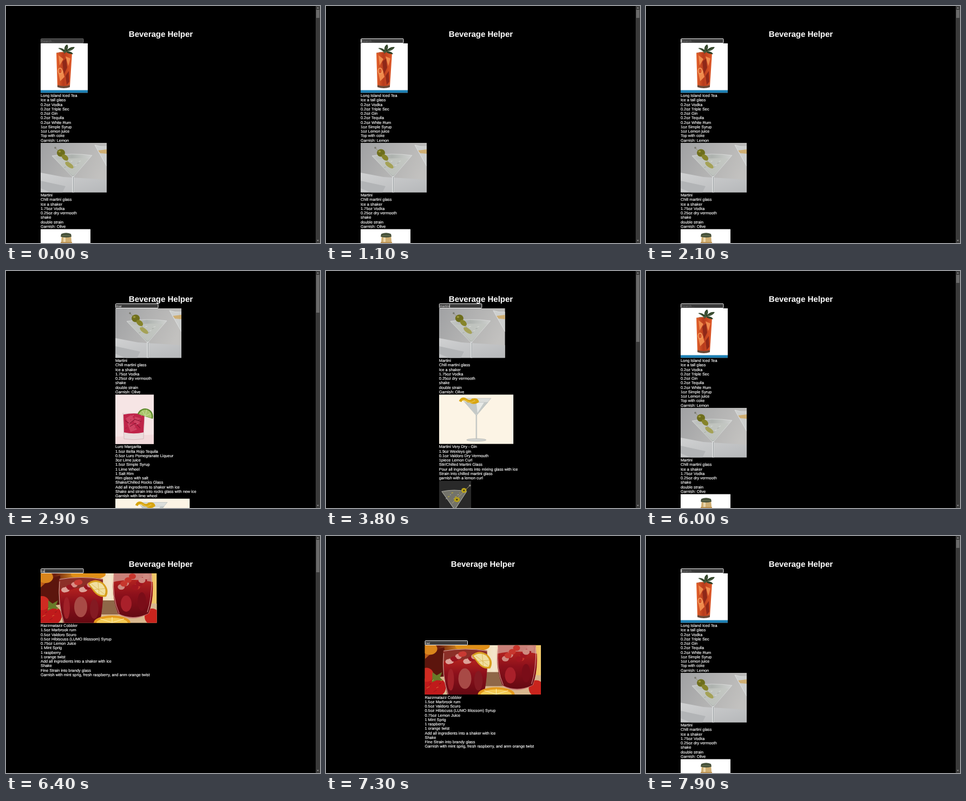
An HTML page that plays this animation: 580 by 438 pixels, repeating every 8 s.

```html
<!DOCTYPE html>
<html lang="en">
<head>
<meta charset="utf-8">
<title>Beverage Helper</title>
<style>
  html, body { margin: 0; width: 100%; height: 100%; overflow: hidden; background: #000; }
  svg { display: block; }
  text { font-family: "Liberation Sans", Arial, sans-serif; fill: #fff; text-rendering: geometricPrecision; }
  .recipe { font-size: 7.33px; stroke: #fff; stroke-width: .15px; }
  .field { font-size: 6px; }
</style>
</head>
<body>
<svg id="stage" width="580" height="438" viewBox="0 0 580 438">
  <defs>
    <linearGradient id="tea" x2="1"><stop stop-color="#e4632c"/><stop offset=".45" stop-color="#b73b1c"/><stop offset="1" stop-color="#e05a28"/></linearGradient>
    <linearGradient id="wall" x2="1" y2=".4"><stop stop-color="#a0a1a3"/><stop offset=".45" stop-color="#b0b0b0"/><stop offset="1" stop-color="#c2c1bf"/></linearGradient>
    <linearGradient id="table" x2="1" y2="1"><stop stop-color="#d0d1d2"/><stop offset="1" stop-color="#b6b8ba"/></linearGradient>
    <linearGradient id="clear" x2="1"><stop stop-color="#c3c6c4"/><stop offset=".5" stop-color="#adb2ae"/><stop offset="1" stop-color="#cfd1cf"/></linearGradient>
    <linearGradient id="wine" x2="0" y2="1"><stop stop-color="#b3221f"/><stop offset=".4" stop-color="#8c101b"/><stop offset="1" stop-color="#640912"/></linearGradient>
    <linearGradient id="fruit" x2="1"><stop stop-color="#c8651a"/><stop offset=".12" stop-color="#6a1d0e"/><stop offset=".3" stop-color="#d98e1f"/><stop offset=".48" stop-color="#f1dcae"/><stop offset=".6" stop-color="#f4e6cc"/><stop offset=".85" stop-color="#e9ae4a"/><stop offset="1" stop-color="#f3cb6c"/></linearGradient>
  </defs>
  <rect width="580" height="438"/>
  <text id="title" y="56.6" text-anchor="middle" font-size="15" font-weight="bold">Beverage Helper</text>
  <g id="list"></g>
  <g id="field">
    <rect id="box" x=".5" y=".5" width="78.5" height="8" rx="1" fill="#3b3b3b"/>
    <text id="query" class="field" x="1.4" y="6.7"></text>
    <rect id="caret" y="1.6" width=".7" height="6" fill="#fff"/>
  </g>
  <g id="scrollbar">
    <rect x="572" width="8" height="438" fill="#3a3a3a"/>
    <rect id="thumb" x="573" y="7" width="6" fill="#6a6a6a"/>
    <path d="M574 4.6l2-2.4 2 2.4zM574 432.4l2 2.4 2-2.4z" fill="#a0a0a0"/>
  </g>
</svg>
<script>
const LOOP = 8000, BLINK = 530, PHOTO_H = 91.5, LINE_H = 8.25;
const $ = id => document.getElementById(id);

const shape = (d, fill, more = '') => `<path d="${d}" fill="${fill}" ${more}/>`;
const stroke = (d, color, width = 1, more = '') => shape(d, 'none', `stroke="${color}" stroke-width="${width}" ${more}`);
const oval = (x, y, rx, ry, fill, more = '') => `<ellipse cx="${x}" cy="${y}" rx="${rx}" ry="${ry}" fill="${fill}" ${more}/>`;
const fillAll = color => `<rect width="100%" height="100%" fill="${color}"/>`;

// Repeatable scatter of small round pieces inside a box
function scatter(count, x, y, w, h, r, colors) {
  let out = '';
  for (let i = 1; i <= count; i++) {
    out += oval((x + i * 0.618 % 1 * w).toFixed(1), (y + i * 0.755 % 1 * h).toFixed(1),
      r, r * 0.8, colors[i % colors.length]);
  }
  return out;
}

const art = {
  tea: () => fillAll('#fff') +
    shape('M29 18L31 80Q43 84 54 80L58 18Q43 14 29 18Z', 'url(#tea)') +
    shape('M33 22l9 7-7 12zM46 24l9 4-4 14zM33 56l8-6 3 12-8 8z', '#ef8a4c') +
    shape('M40 34l7-6 2 17-6 12zM46 60l6-9 1 20-5 6z', '#8f2818') +
    oval(36, 51, 4.5, 6, '#f2a15f') + oval(36, 51, 2.8, 4.2, '#d9552a') +
    shape('M31 77Q43 81 54 77v4Q43 85 31 81z', '#6b4a38') +
    stroke('M29 18Q43 14 58 18', '#bd6f4a') +
    shape('M44 19Q41 12 32 9Q38 7 44 12Q43 5 49 2Q52 6 49 12Q55 6 63 7Q60 13 50 15Q58 15 60 20Q52 20 47 16Z', '#2f4228') +
    stroke('M44 18L48 6M46 16L60 9M45 17L34 10', '#71835f', 0.7) +
    shape('M0 86.5h87v5H0z', '#1d80b4'),

  martini: () => fillAll('url(#wall)') +
    shape('M0 55L42 63 122 68V92H0Z', 'url(#table)') +
    shape('M0 70L46 80 40 92H20L0 84Z', '#b2b4b6') +
    shape('M21 24Q57 18 95 23L61 62 58 62Z', 'url(#clear)') +
    shape('M28 31Q58 27 89 29L61 60H58Z', '#c3c7c2', 'opacity=".8"') +
    scatter(16, 43, 33, 32, 15, 0.7, ['#e4e7e4', '#959b93']) +
    stroke('M21 24Q57 18 95 23L61 62 58 62Z', '#dcdedd', 0.8) +
    stroke('M60 62V92', '#dfe1e1', 3.2) + stroke('M60.5 63V92', '#92979a', 1) +
    stroke('M27 9L60 45', '#8d8a60', 0.8) + oval(27, 9, 1.8, 1.8, '#77786e') +
    oval(37.5, 18.5, 7.5, 7, '#6e6e1c') + oval(45, 27, 7, 4.6, '#86842a', 'transform="rotate(40 45 27)"') +
    oval(53, 41, 9, 4, '#a5a257', 'transform="rotate(35 53 41)"') +
    oval(35, 16, 2.3, 1.8, '#a09a3c') +
    shape('M100 4Q110 8 122 7V43Z', '#cdcfce') + shape('M106 14L122 12V20L110 19Z', '#cfae72') +
    stroke('M122 7Q110 8 100 4L122 43', '#e4e6e6', 0.8),

  bottle: () => fillAll('#fff') +
    shape('M39 12H56L58 32Q69 44 68 92H27Q26 44 37 32Z', '#cfae72') +
    shape('M42 14h4v40h-4z', '#ead6aa') +
    shape('M38 9Q47 5 56 9L57 14Q47 17 37 14Z', '#45503a') +
    stroke('M40 12h14', '#8a9469', 0.7) + shape('M37 24h21v5H37z', '#b98d4d'),

  dry: () => fillAll('#fcf4e5') +
    shape('M41 7H96L70 38H68Z', '#dcdedb') + shape('M47 14H91L70 37H68Z', '#c4c9c7') +
    shape('M69 15h14L71 34z', '#e8eae7') +
    stroke('M41 7H96L70 38H68Z', '#b9bdbb', 0.7) +
    stroke('M69 38V83', '#b3b7b5', 2.4) + stroke('M69 39V83', '#e4e6e4', 0.8) +
    oval(69, 84, 18, 2.4, '#d2d4d1', 'stroke="#a9adab" stroke-width=".7"') +
    stroke('M39 13Q43 5 50 10T62 10Q70 8 71 13Q65 17 58 13', '#d8a510', 5) +
    stroke('M43 11Q49 9 54 13T66 11', '#f2d467', 1),

  dark: () => fillAll('#292929') +
    shape('M0 62L59 49V92H0Z', '#383838') +
    shape('M5 20Q28 15 51 20L31 52H27Z', '#73736a') +
    stroke('M5 20Q28 15 51 20L30 52H28Z', '#bbbbb4', 0.9) + stroke('M29 52V92', '#aaa', 2) +
    scatter(14, 12, 22, 28, 14, 0.9, ['#c7b52d', '#aaa']) +
    stroke('M24 42L58 8', '#bcae72', 0.9) + oval(57, 9, 1.8, 1.8, '#85847c') +
    oval(46, 18, 4.8, 4.5, '#bba51b') + oval(33, 35, 5.5, 4.5, '#b49e18') +
    oval(46, 18, 1.6, 1.6, '#443d13') + oval(33, 35, 1.6, 1.6, '#443d13'),

  pomegranate: () => fillAll('#f6e5e5') +
    shape('M0 78L71 74V92H0Z', '#f2dadb') +
    shape('M14 34H54L52 82Q34 85 16 82Z', '#eadcdc') +
    shape('M15 37Q34 33 54 37L52 70Q34 74 16 70Z', '#bf2449') +
    shape('M19 44l10-6 7 9-10 9zM36 41l11 3-3 11-10-3zM23 56l11-2 6 11-12 4z', '#cf4262') +
    stroke('M18 48l8 6 10-8 12 4M27 59l10-6 9 9', '#8f1735', 1.3) +
    scatter(14, 18, 38, 32, 30, 0.8, ['#e58a9f', '#97193b']) +
    stroke('M14 34L16 82Q34 85 52 82L54 34', '#cda9af', 0.7) +
    shape('M41 36A14.5 14.5 0 0 1 69 45Z', '#5d8a2c') +
    shape('M43.5 36.5A12 12 0 0 1 66.5 43.5Z', '#a9c56c') +
    stroke('M55 40L50 30M55 40L58 28M55 40L65 35', '#dfebbb', 0.7),

  cobbler: () => fillAll('url(#fruit)') +
    shape('M0 26Q18 8 36 4L40 60H0Z', '#5c150d') +
    oval(9, 7, 14, 11, '#d9851c') + oval(88, 2, 32, 10, '#e08f17') +
    shape('M0 62Q104 48 215 56V92H0Z', '#d9b88f') +
    shape('M108 50h30l10 26h-40z', '#8f6748') +
    oval(15, 78, 24, 20, '#c01a1b') + oval(3, 55, 13, 13, '#d02b22') + oval(206, 80, 14, 15, '#c9241d') +
    shape('M14 50l8 6 10-6-4 10 6 6-12-1-9 4 1-9z', '#687a28') +
    scatter(18, 0, 64, 34, 26, 0.7, ['#eebb53', '#791014']) +
    shape('M34 10Q75 4 115 10Q117 54 109 92H42Q31 52 34 10Z', '#8c2f28') +
    shape('M35 30Q73 24 115 30Q116 59 109 92H42Q34 62 35 30Z', 'url(#wine)') +
    scatter(13, 42, 16, 62, 18, 6, ['#c93a33', '#dda198', '#98141f', '#d98f86']) +
    oval(74, 62, 12, 19, '#a84a46') + oval(99, 66, 8, 18, '#841a22') + oval(48, 64, 6, 20, '#a02128') +
    stroke('M35 11Q75 4 115 11M35 15Q31 55 43 91', '#e0bfb2', 0.9) +
    shape('M135 0H205Q210 46 200 74Q170 92 143 75Q130 42 135 0Z', '#c98078') +
    shape('M134 16Q170 8 207 16Q209 50 199 74Q170 88 143 74Q132 46 134 16Z', 'url(#wine)') +
    scatter(11, 144, 5, 54, 26, 6.5, ['#a1151f', '#c7362d', '#cf8a80']) +
    oval(158, 56, 10, 15, '#a9202a') + oval(187, 52, 8, 17, '#7a0d18') +
    stroke('M135 4Q132 46 145 74M205 4Q206 47 197 72', '#e6b5a8', 0.9) +
    shape('M87 19Q100 7 116 18Q128 30 121 43Q108 46 98 34Z', '#d9a01f') +
    shape('M90 20Q102 12 114 20Q123 30 118 40Q108 42 100 32Z', '#f0dfa0') +
    stroke('M94 20L117 38M106 17L108 39M99 30L120 28', '#d8b24a', 0.8) +
    oval(132, 91, 34, 13, '#e49a1d') + oval(132, 92, 29, 10, '#f4cb55') +
    stroke('M132 91V81M132 91L110 84M132 91L154 84', '#fff0b8', 1)
};

const drink = (name, width, steps) => ({ name, width, lines: steps ? steps.split('|') : [] });
const drinks = {
  tea: drink('tea', 87, 'Long Island Iced Tea|Ice a tall glass|0.2oz Vodka|0.2oz Triple Sec|0.2oz Gin|0.2oz Tequila|0.2oz White Rum|1oz Simple Syrup|1oz Lemon juice|Top with coke|Garnish: Lemon'),
  martini: drink('martini', 122, 'Martini|Chill martini glass|Ice a shaker|1.75oz Vodka|0.25oz dry vermooth|shake|double strain|Garnish: Olive'),
  bottle: drink('bottle', 92),
  dry: drink('dry', 137.5, 'Martini Very Dry - Gin|1.9oz Wexleys gin|0.1oz Valdoro Dry Vermouth|1piece Lemon Curl|Stir/Chilled Martini Glass|Pour all ingredients into mixing glass with ice|Strain into chilled martini glass|garnish with a lemon curl'),
  dark: drink('dark', 59.5),
  pomegranate: drink('pomegranate', 71, 'Luro Margarita|1.5oz Belta Rojo Tequila|0.5oz Luro Pomegranate Liqueur|3oz Lime juice|1.5oz Simple Syrup|1 Lime Wheel|1 Salt Rim|Rim glass with salt|Shake/Chilled Rocks Glass|Add all ingredients to shaker with ice|Shake and strain into rocks glass with new ice|Garnish with lime wheel'),
  cobbler: drink('cobbler', 214.5, 'Razzmatazz Cobbler|1.5oz Marbrook rum|0.5oz Valdoro Scuro|0.5oz Hibiscuss (LUMO Blossom) Syrup|0.75oz Lemon Juice|1 Mint Sprig|1 raspberry|1 orange twist|Add all ingredients into a shaker with ice|Shake|Fine Strain into brandy glass|Garnish with mint sprig, fresh raspberry, and anm orange twist')
};

const page = (x, thumb, items, y = 60) => ({ x, y, thumb, items: items.split(' ') });
const mar = 'martini pomegranate dry';
const exact = page(208.8, 124, 'martini dry dark');
const pages = {
  '': page(64, 15, 'tea martini bottle'),
  r: page(64, 22, mar),
  ra: page(64, 60, 'cobbler'),
  raz: page(182.5, 0, 'cobbler', 193),
  m: page(136, 40, mar),
  ma: page(202, 62, mar),
  mar: page(202, 70, mar),
  mart: exact, marti: exact, martin: exact, martini: exact
};

// [time, text in the field, start of the caret blink if not that time]
const keys = [
  [0, ''], [100, '', -30], [2300, 'ma'], [2400, 'mar', 2370],
  [3500, 'mart'], [3600, 'marti'], [3700, 'martin'], [3800, 'martini'],
  [4500, 'martin'], [4600, 'marti'], [4700, 'mart'],
  [4900, 'mar'], [5000, 'ma'], [5100, 'm'], [5300, '', 5400],
  [6300, 'r'], [6400, 'ra'], [6700, 'raz'],
  [7500, 'ra'], [7700, 'r'], [7800, '']
];

function card({ name, width, lines }, x, y) {
  const photo = `<svg x="${x}" y="${y}" width="${width}" height="${PHOTO_H}" overflow="hidden">${art[name]()}</svg>`;
  return photo + lines.map((line, i) =>
    `<text class="recipe" x="${x}" y="${y + 99 + i * LINE_H}">${line}</text>`).join('');
}

function showPage(text) {
  const { x, y, thumb, items } = pages[text];
  let top = y + (thumb ? 9 : 8.5);
  $('list').innerHTML = items.map(name => {
    const html = card(drinks[name], x, top);
    top += PHOTO_H + 1.75 + drinks[name].lines.length * LINE_H;
    return html;
  }).join('');
  $('field').setAttribute('transform', `translate(${x} ${y})`);
  $('title').setAttribute('x', thumb ? 286 : 290);
  $('scrollbar').style.display = thumb ? '' : 'none';
  $('thumb').setAttribute('height', thumb);
  $('query').textContent = text || 'Search...';
  $('query').style.fill = text ? '#f4f4f4' : '#777';
  $('caret').setAttribute('x', 1.4 + (text ? $('query').getComputedTextLength() : 0));
}

let shown = null;
function render(t) {
  const [time, text, since = time] = keys.findLast(key => key[0] <= t);
  if (text !== shown) showPage(shown = text);
  const focused = time > 0;
  const lit = Math.floor(Math.max(0, t - since) / BLINK) % 2 === 0;
  $('box').setAttribute('stroke', focused ? '#f0f0f0' : '#686868');
  $('caret').style.display = focused && lit ? '' : 'none';
}

const start = performance.now();
function tick() {
  render(Math.max(0, performance.now() - start) % LOOP);
  requestAnimationFrame(tick);
}
tick();
</script>
</body>
</html>
```
